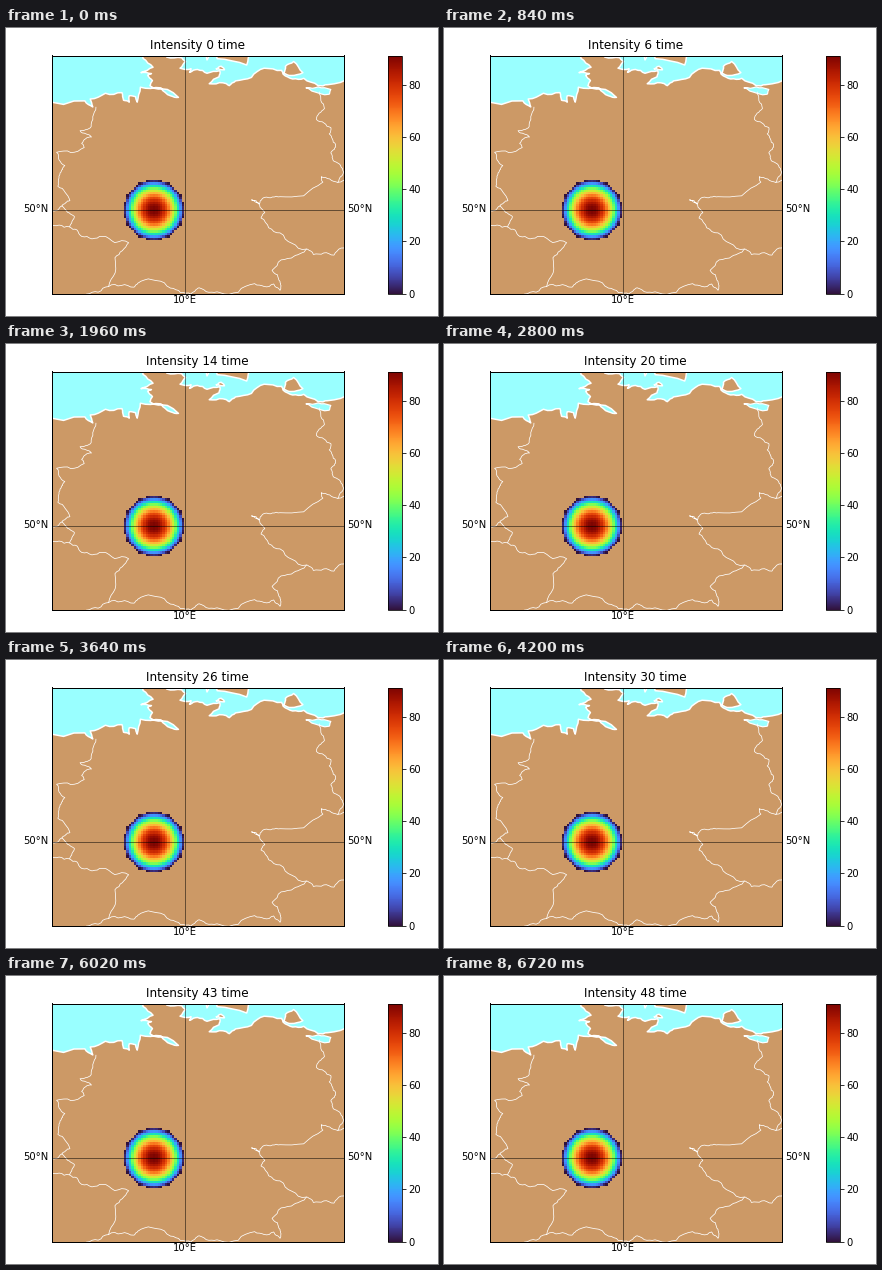
Recreate the animation shown at these times as a matplotlib script. Size 432 by 288 pixels, loop 6.86 s.

```python
import random

import matplotlib.pyplot as plt
import numpy as np
from matplotlib.animation import FuncAnimation

W, H, DPI = 432, 288, 72
FRAMES, STEP_MS = 49, 140
LAND, WATER = "#cc9966", "#99ffff"
WEST, EAST, SOUTH, NORTH = 5.8, 15.0, 47.37, 54.87
PEAK = 91.2

random.seed(4)

# Outlines as (longitude, latitude); roughen() adds the small bends
NORTH_SEA = [
    (5.5, 53.36), (6.85, 53.44), (7.1, 53.25), (7.02, 53.5), (7.5, 53.68),
    (8.02, 53.7), (8.07, 53.46), (8.25, 53.4), (8.25, 53.6), (8.45, 53.57),
    (8.5, 53.4), (8.6, 53.87), (9.25, 53.85), (9.55, 53.6), (9.8, 53.55),
    (9.45, 53.8), (8.9, 53.92), (8.98, 54.08), (8.83, 54.25), (8.95, 54.3),
    (8.62, 54.33), (9.0, 54.5), (8.68, 54.78), (8.68, 55.0),
]
BALTIC = [
    (10.05, 55.0), (10.02, 54.88), (9.43, 54.82), (9.9, 54.8), (10.03, 54.68),
    (9.85, 54.47), (10.2, 54.45), (10.15, 54.34), (10.4, 54.43), (10.7, 54.31),
    (11.1, 54.39), (11.08, 54.2), (10.77, 53.98), (11.2, 54.01), (11.4, 53.92),
    (11.6, 54.07), (12.1, 54.18), (12.5, 54.47), (13.05, 54.4), (13.1, 54.28),
    (13.4, 54.13), (13.75, 54.15), (14.2, 53.92), (14.5, 53.95), (15.3, 54.13),
]
ISLANDS = [
    [(10.66, 55.0), (10.7, 54.73), (10.85, 55.0)],
    [(10.98, 55.0), (11.02, 54.77), (11.95, 54.57), (12.1, 55.0)],
    [(11.0, 54.45), (11.15, 54.53), (11.25, 54.42)],
    [(13.12, 54.32), (13.17, 54.53), (13.43, 54.68), (13.72, 54.33),
     (13.35, 54.24)],
]
LAGOON = [(13.83, 53.85), (14.0, 53.75), (14.55, 53.65), (14.6, 53.8),
          (14.2, 53.88)]
BORDERS = [
    [(7.2, 53.24), (7.05, 52.63), (6.7, 52.5), (7.06, 52.3), (6.75, 52.1),
     (6.83, 51.97), (5.96, 51.82), (6.22, 51.4), (6.07, 51.17), (6.0, 50.75),
     (6.38, 50.3), (6.13, 50.13), (6.52, 49.8), (6.37, 49.47), (6.75, 49.17),
     (7.4, 49.17), (8.23, 48.97), (7.8, 48.5), (7.6, 47.59)],
    [(6.13, 50.13), (5.7, 49.95)],
    [(5.7, 49.54), (6.37, 49.47)],
    [(7.6, 47.59), (6.9, 47.35)],
    [(7.6, 47.59), (8.4, 47.57), (8.6, 47.75), (9.55, 47.54), (10.2, 47.35),
     (10.45, 47.55), (11.1, 47.4), (12.2, 47.68), (12.8, 47.67), (13.0, 47.47),
     (13.0, 47.75), (12.75, 48.1), (13.45, 48.55), (13.83, 48.77)],
    [(15.2, 48.95), (14.7, 48.58), (14.05, 48.6), (13.83, 48.77), (13.0, 49.28),
     (12.4, 49.75), (12.52, 49.92), (12.1, 50.32), (12.35, 50.2), (12.52, 50.4),
     (13.0, 50.42), (14.35, 50.88), (14.3, 51.05), (14.82, 50.87), (15.0, 51.2),
     (14.72, 51.53), (14.6, 51.8), (14.75, 52.07), (14.55, 52.4), (14.6, 52.6),
     (14.15, 52.85), (14.4, 53.2), (14.25, 53.72)],
    [(14.82, 50.87), (15.2, 51.0)],
]


def roughen(points, amount=0.1, rounds=2):
    """Add small random bends between the given points."""
    for _ in range(rounds):
        out = [points[0]]
        for (x0, y0), (x1, y1) in zip(points, points[1:]):
            k = random.uniform(-amount, amount)
            out.append(((x0 + x1) / 2 - k * (y1 - y0),
                        (y0 + y1) / 2 + k * (x1 - x0)))
            out.append((x1, y1))
        points = out
    return points


def box(left, top, right, bottom):
    return [left / W, 1 - bottom / H, (right - left) / W, (bottom - top) / H]


def label(x, y, text, ha, va):
    fig.text(x / W, 1 - y / H, text, ha=ha, va=va, fontsize=10)


def draw_map():
    def fill(points, color):
        ax.fill(*zip(*points), facecolor=color, edgecolor="none", zorder=1)

    def line(points, width):
        ax.plot(*zip(*points), color="white", lw=width, zorder=1.5)

    west, east = roughen(NORTH_SEA), roughen(BALTIC)
    fill(west + east + [(15.3, 47), (5.5, 47)], LAND)
    line(west, 1.5)
    line(east, 1.5)
    for island in ISLANDS:
        ring = roughen(island + island[:1])
        fill(ring, LAND)
        line(ring, 1.5)
    ring = roughen(LAGOON + LAGOON[:1])
    fill(ring, WATER)
    line(ring, 1.2)
    for border in BORDERS:
        line(roughen(border, 0.15, 3), 0.75)


def draw_spot():
    n, half = 12, 0.93
    i, j = np.mgrid[-n:n + 1, -n:n + 1]
    d2 = i**2 + j**2
    value = PEAK * np.clip(1 - d2 / 150, 0, 1)
    lon, lat = 9.0, 49.98
    return ax.imshow(np.ma.masked_where(d2 > 157, value), cmap="turbo",
                     vmin=0, vmax=PEAK, interpolation="nearest", aspect="auto",
                     extent=[lon - half, lon + half, lat - half, lat + half],
                     zorder=1.8)


plt.rcParams["font.family"] = "DejaVu Sans"
fig = plt.figure(figsize=(W / DPI, H / DPI), dpi=DPI, facecolor="white")
ax = fig.add_axes(box(45.5, 27.5, 337.5, 265.5), facecolor=WATER)
draw_map()
spot = draw_spot()
for draw, at in ((ax.axvline, 10), (ax.axhline, 50)):
    draw(at, color="black", lw=1, dashes=[1, 1], dash_capstyle="butt", zorder=2)
ax.set(xlim=(WEST, EAST), ylim=(SOUTH, NORTH), xticks=[], yticks=[])
for spine in ax.spines.values():
    spine.set_linewidth(1)

label(42, 181.5, "50°N", "right", "center")
label(341, 181.5, "50°N", "left", "center")
label(178.5, 267, "10°E", "center", "top")

cax = fig.add_axes(box(381.5, 27.5, 395.5, 265.5))
fig.colorbar(spot, cax=cax, ticks=range(0, 81, 20))

title = ax.set_title("", fontsize=12, pad=6)


def update(frame):
    title.set_text(f"Intensity {frame} time")
    return [title]


anim = FuncAnimation(fig, update, frames=FRAMES, interval=STEP_MS,
                     repeat=True, repeat_delay=0)
plt.show()
```
